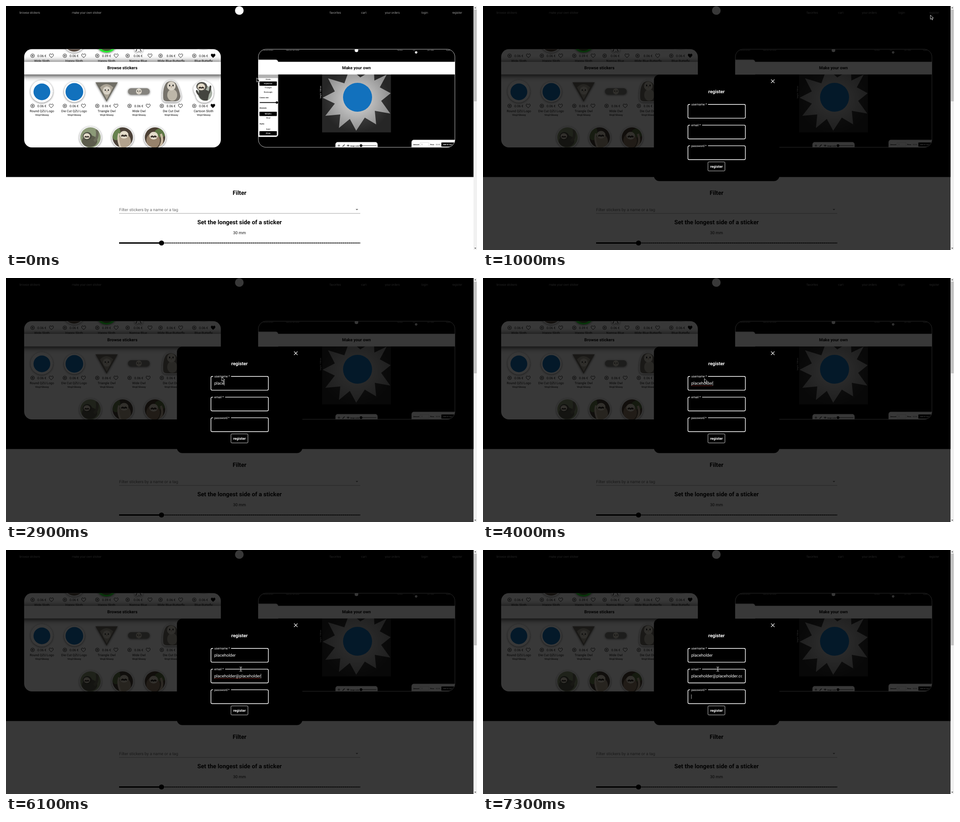
These frames come from a looping animation (1037 by 540 pixels, 8 s). An HTML page:

```html
<!DOCTYPE html>
<html lang="en">
<head>
<meta charset="utf-8">
<title>Sticker shop registration</title>
<style>
html, body { margin: 0; width: 100%; height: 100%; overflow: hidden; background: #000; }
svg { display: block; width: 100%; height: 100%; }
text { font-family: Roboto, sans-serif; text-rendering: geometricPrecision; white-space: pre; }
</style>
</head>
<body>
<svg id="stage" viewBox="0 0 1037 540" xmlns="http://www.w3.org/2000/svg"></svg>
<script>
const BLUE = '#1271bd';
const USER = 'placeholder';
const MAIL = USER + '@' + USER + '.com';

// Markup helpers
const text = (x, y, str, size, fill = '#000', weight = 400, anchor = 'middle', more = '') =>
  `<text x="${x}" y="${y}" font-size="${size}" fill="${fill}" font-weight="${weight}" text-anchor="${anchor}" ${more}>${str}</text>`;
const rect = (x, y, w, h, r, fill, more = '') =>
  `<rect x="${x}" y="${y}" width="${w}" height="${h}" rx="${r}" fill="${fill}" ${more}/>`;
const circle = (x, y, r, fill, more = '') => `<circle cx="${x}" cy="${y}" r="${r}" fill="${fill}" ${more}/>`;
const oval = (x, y, rx, ry, fill, more = '') =>
  `<ellipse cx="${x}" cy="${y}" rx="${rx}" ry="${ry}" fill="${fill}" ${more}/>`;
const path = (d, fill, more = '') => `<path d="${d}" fill="${fill}" ${more}/>`;
const line = (d, stroke, width, more = '') =>
  `<path d="${d}" fill="none" stroke="${stroke}" stroke-width="${width}" ${more}/>`;
const group = (more, ...parts) => `<g ${more}>${parts.join('')}</g>`;
const at = (x, y, s, ...parts) => group(`transform="translate(${x} ${y}) scale(${s})"`, ...parts);

const defs = `<defs>
  <clipPath id="left"><rect x="40" y="95.5" width="433" height="217.5" rx="17"/></clipPath>
  <clipPath id="right"><rect x="555.5" y="95.5" width="433" height="217.5" rx="17"/></clipPath>
  <clipPath id="mailbox"><rect x="458" y="270" width="112.3" height="20"/></clipPath>
  <clipPath id="disc"><circle r="22.5"/></clipPath>
  <filter id="blur" x="-20%" y="-150%" width="140%" height="400%"><feGaussianBlur stdDeviation="7"/></filter>
  <filter id="lift" x="-30%" y="-30%" width="160%" height="160%">
    <feDropShadow dx="0" dy="1" stdDeviation="2.2" flood-opacity=".6"/></filter>
  <radialGradient id="metal"><stop offset="0" stop-color="#555"/><stop offset="1" stop-color="#262626"/></radialGradient>
  <radialGradient id="silver"><stop offset="0" stop-color="#ddd"/><stop offset="1" stop-color="#909090"/></radialGradient>
</defs>`;

function nav() {
  const items = [[52.3, 'browse stickers'], [177.7, 'make your own sticker'], [725, 'favorites'],
    [787.8, 'cart'], [850.5, 'your orders'], [921.8, 'login'], [993.3, 'register']];
  return items.map(([x, s]) => text(x, 16.8, s, 6.6, '#e8e8e8', 300)).join('') + circle(513.7, 10, 9.5, '#fff');
}

const owl = (x, y, s) => at(x, y, s,
  oval(0, 0, 9, 9.5, '#d8d2c6'), oval(-3.6, -1, 1.3, 2, '#222'), oval(3.6, -1, 1.3, 2, '#222'),
  path('M-1 0L1 0L0 5Z', '#a8937a'));

const sloth = (x, y, s, face = '#e4dccb') => at(x, y, s,
  oval(0, 0, 9, 8, face), oval(-4, 0, 3, 1.8, '#3d332b', 'transform="rotate(-25)"'),
  oval(4, 0, 3, 1.8, '#3d332b', 'transform="rotate(25)"'), oval(0, 2.5, 2, 1.5, '#222'));

const HEART = 'M0 4.2C-7 -.6 -4.4 -4.6 -2 -4Q-.6 -3.7 0 -2.4Q.6 -3.7 2 -4C4.4 -4.6 7 -.6 0 4.2Z';

function offer(x, y, price, name, full, l = 20.5, r = 20.5) {
  return circle(x - l, y, 4, 'none', 'stroke="#111" stroke-width=".9"') +
    line(`M${x - l - 2.2} ${y}h4.4m-2.2 -2.2v4.4`, '#111', .9) +
    text(x, y + 2.6, price + ' €', 7.2, '#111') +
    at(x + r, y, 1, path(HEART, full ? '#000' : 'none', 'stroke="#111" stroke-width=".95"')) +
    text(x, y + 13.5, name, 7.15, '#111');
}

const photo = (x, y, bg, ...parts) => at(x, y, 1,
  circle(0, 0, 24.3, '#f4f4f4', 'filter="url(#lift)"'), circle(0, 0, 22.5, bg),
  group('clip-path="url(#disc)"', ...parts));

function browseCard() {
  const cols = [79, 150, 221.5, 292.5, 363.5, 435];
  const top = ['Wide Sloth', 'Happy Sloth', 'Happy Sloth', 'Narrow Blue', 'Wide Blue Butterfly', 'Blue Buttefly'];
  const low = ['Round QZU Logo', 'Die Cut QZU Logo', 'Triangle Owl', 'Wide Owl', 'Die Cut Owl', 'Cartoon Sloth'];
  const stickers = [
    circle(78.7, 189, 24.5, '#fff', 'filter="url(#lift)"') + circle(79, 190, 18.5, BLUE),
    circle(150.5, 190, 22.5, '#fff', 'filter="url(#lift)"') + circle(150.5, 190, 19.5, BLUE),
    path('M197 169H246L221.5 212Z', '#706e65', 'filter="url(#lift)"') +
      path('M207 180Q221 166 236 180L222 207Z', '#aaa395') + owl(222, 187, .95),
    rect(268.5, 182, 48, 14, 7, '#85837e', 'filter="url(#lift)"') + owl(292.5, 189, .7),
    path('M352 168Q364 160 375 169Q383 182 386 200Q386 211 374 213H355Q344 213 344 203Q343 178 352 168Z', '#e8e8e8', 'filter="url(#lift)"') +
      path('M353 170Q364 162 374 171Q382 185 384 200Q383 210 373 211H355Q346 211 346 203Q345 180 353 170Z', '#77736b') +
      oval(366, 197, 11, 13, '#bdb7a9') + owl(364, 177, 1.05),
    path('M425 168Q434 161 443 168Q458 174 457 192Q456 212 438 214Q420 214 418 198Q408 182 417 174Z', '#fff', 'filter="url(#lift)"') +
      oval(438, 193, 16, 17, '#a8b0a5') + path('M425 186Q437 181 448 190L444 209Q430 211 425 200Z', '#44443f') +
      oval(431, 178, 12, 10, '#55544e') + sloth(430, 179, .95) +
      line('M441 198Q450 192 450 178M426 197Q421 193 420 188', '#44443f', 4, 'stroke-linecap="round"'),
  ];
  return group('clip-path="url(#left)"',
    rect(40, 95, 433, 219, 0, '#fff'),
    circle(150, 79, 24, '#f4f4f4', 'filter="url(#lift)"') + circle(150, 79, 22, '#5a4c42'),
    circle(221.5, 79, 24, '#25e82f', 'filter="url(#lift)"') + circle(221.5, 79, 20, '#4d4a35'),
    path('M282 94H302L299 103L293 99L286 103Z', '#fff', 'filter="url(#lift)"') + line('M288 95L286 101M295 95L298 101', '#222', 1.5),
    oval(435, 92, 20, 5, '#bbb') + oval(79, 90, 24, 5, '#eee'),
    cols.map((x, i) => offer(x - (i == 3 ? 1.5 : 0), 110, i == 2 ? '0.09' : '0.06', top[i], i == 5,
      i == 3 || i == 4 ? 23.2 : 20.5, i == 3 ? 26 : 21)).join(''),
    rect(32, 125, 449, 28, 0, '#000', 'filter="url(#blur)"'),
    rect(40, 123.5, 433, 28, 0, '#fff'),
    ...stickers,
    cols.map((x, i) => offer(x, 221, '0.06', low[i], i == 5) +
      text(x + .3, 242.5, 'Vinyl/Glossy', 5.4, '#222', 500)).join(''),
    photo(186, 291, '#8c9a78', oval(-2, 8, 17, 13, '#5d5d4d'), oval(-7, -3, 10, 9, '#4c4c42'), sloth(-8, -3, .8),
      line('M8 8Q18 0 14 -18', '#6c6c5c', 6)),
    photo(257, 291, '#4b4138', oval(-15, -10, 10, 16, '#67824f'), oval(4, 9, 14, 17, '#b3a38e'), sloth(3, -6, 1.05),
      line('M-4 24Q-13 5 -8 -9', '#d6c9b5', 4)),
    photo(328, 291, '#4c4034', oval(12, -10, 13, 10, '#5e7845'), oval(-4, 7, 15, 17, '#97826b'), sloth(-3, -4, 1.05),
      line('M10 22Q20 8 13 -8', '#c9b9a1', 5))) +
    text(256.3, 140.3, 'Browse stickers', 9.25, '#000', 700);
}

function makerCard() {
  const star = 'M709 160L745 171L757 138L780 158L810 140L811 165L838 152L823 180L847 193L826 210L846 238L812 232' +
    'L815 262L790 247L771 276L757 250L733 270L736 240L703 243L724 216L697 203L724 189Z';
  const options = [[164, 'Circle'], [173, 'Explosion', 1], [182.3, 'Triangle'], [191.7, 'Rectangle'],
    [240, 'Metallic', 1], [249, 'Vinyl'], [273.7, 'Gold'], [283, 'Silver', 1]];
  const heads = [[203.6, 'Canvas size'], [227.4, 'Materials'], [261.5, 'Styles']];
  const tiny = [[578, 'browse stickers'], [631, 'make your own sticker'], [867.5, 'favorites'],
    [898, 'cart'], [935, 'your orders'], [973, 'logout']];
  return group('clip-path="url(#right)"',
    rect(555, 95, 434, 219, 0, '#000'),
    tiny.map(([x, s]) => text(x, 99.3, s, 3, '#ccc')).join(''),
    circle(771.6, 98, 4, '#fff'),
    circle(903, 102.6, 2.6, '#fff') + line('M903 101v1.8h1', '#000', .6),
    rect(550, 119, 49, 170.5, 5, '#fff', 'stroke="#aaa" stroke-width="1"'),
    options.map(([y, s, on]) => (on ? rect(558, y - 6, 38.3, 9.4, 1, '#000') : '') +
      text(577.2, y, s, 4.2, on ? '#fff' : '#222', 500)).join(''),
    heads.map(([y, s]) => text(558.3, y, s, 3.7, '#000', 700, 'start')).join(''),
    line('M558.5 213.6H596', '#000', 1.6) + circle(596.3, 213.6, 2.6, '#000'),
    rect(696, 140, 151.5, 139.7, 0, 'url(#metal)'),
    path(star, 'url(#silver)'),
    circle(774, 202, 32, BLUE),
    text(0, 0, 'height: 100mm', 4.2, '#ddd', 400, 'middle', 'transform="translate(693.6 190.5) rotate(-90)"'),
    rect(725.5, 301.3, 92.5, 20, 5, '#fff', 'stroke="#bbb" stroke-width=".7"'),
    line('M730.3 309h5.4M733 306.3v5.4', '#222', .9) + line('M741 311.3L745.5 306.8', '#222', 1.4) +
      line('M750.5 309Q753.3 305.8 756 309Q753.3 312 750.5 309Z', '#222', .8) + circle(753.3, 309, 1, '#222'),
    text(767.7, 310.5, 'Image scale', 3.6, '#000', 700),
    line('M781 309H815.5', '#222', .9) + circle(781.6, 309, 3, '#000'),
    rect(893, 296.3, 100, 24, 5, '#fff', 'stroke="#bbb" stroke-width=".7"'),
    text(903.3, 308, 'Amount', 3.7, '#000', 700) + text(915.8, 308, '1', 4, '#111') +
      rect(911.8, 302, 19.4, 9, 1, 'none', 'stroke="#bbb" stroke-width=".5"'),
    text(938.2, 308, 'Price', 3.7, '#000', 700) + text(951, 308, '0.3 €', 4, '#111'),
    rect(958.5, 302, 30, 9.2, 1, '#000') + text(972.3, 308, 'Add to cart', 4, '#fff', 700),
    rect(555, 151.5, 44, 8, 0, '#000', 'opacity=".3"'),
    rect(555, 123.5, 434, 28, 0, '#fff')) +
    rect(555.7, 95.7, 432.6, 217, 17, 'none', 'stroke="#eee" stroke-width=".8"') +
    text(771.6, 140.3, 'Make your own', 9.25, '#000', 700);
}

function filterPanel() {
  return rect(0, 378.5, 1030, 162, 0, '#fff') +
    text(514.2, 418.3, 'Filter', 13.1, '#000', 700) +
    text(249, 453.5, 'Filter stickers by a name or a tag', 9.02, '#6b6b6b', 400, 'start') +
    line('M249 459H780', '#8c8c8c', .8) + path('M769.8 449.2h5.6l-2.8 2.9Z', '#666') +
    text(514.1, 482.7, 'Set the longest side of a sticker', 13.1, '#000', 700) +
    text(514, 505.3, '30 mm', 9, '#111') +
    line('M249 524.5H780', '#8a8a8a', 1.3) +
    line('M249 524.5H780', '#000', 1.5, 'stroke-dasharray="3.6 1"') +
    line('M249 524.5H342', '#000', 3) + circle(342.4, 524.5, 5.6, '#000');
}

const scrollbar = rect(1029.3, 0, 8, 540, 0, '#f1f1f1') + rect(1030.3, 8, 6, 203, 0, '#c1c1c1') +
  path('M1031.2 5L1035.4 5L1033.3 2.6Z', '#505050') + path('M1031.2 535L1035.4 535L1033.3 537.4Z', '#505050');

function dialog() {
  const field = (y, label, gap, id) =>
    line(`M456 ${y}H454Q451.3 ${y} 451.3 ${y + 2.7}V${y + 28}Q451.3 ${y + 30.6} 454 ${y + 30.6}H575` +
      `Q577.6 ${y + 30.6} 577.6 ${y + 28}V${y + 2.7}Q577.6 ${y} 575 ${y}H${gap}`, '#fff', 1.4) +
    text(458.6, y + 2.2, label + ' *', 6.7, '#fff', 400, 'start') +
    (id ? text(458.5, y + 18.5, '', 9.05, '#fff', 400, 'start', `id="${id}"`) : '');
  return rect(0, 0, 1029.3, 540, 0, '#000', 'opacity=".78"') +
    rect(376.3, 152, 276.2, 235.5, 12, '#000') +
    line('M634.2 162.7l7.6 7.6m0 -7.6l-7.6 7.6', '#fff', 1.2) +
    text(514.1, 193.4, 'register', 10.35, '#fff', 700) +
    field(217.8, 'username', 495.5, 'user') +
    group('clip-path="url(#mailbox)"', text(458.5, 282, '', 9.05, '#fff', 400, 'start', 'id="mail"')) +
    field(263.6, 'email', 482.5) + field(309.4, 'password', 495.5) +
    group('clip-path="url(#mailbox)"', line('', '#e0453a', .8, 'id="mailMark" stroke-dasharray="1.2 .8"')) +
    line('', '#e0453a', .8, 'id="userMark" stroke-dasharray="1.2 .8"') +
    rect(495.3, 345, 37.4, 20, 2, 'none', 'stroke="#ddd" stroke-width=".9"') +
    text(514, 357.8, 'register', 7.95, '#fff', 700) +
    rect(0, 0, .7, 10, 0, '#fff', 'id="caret"');
}

const pointers = group('id="pointer"',
  path('M0 0V9.4L2.2 7.4L3.8 10.9L5.4 10.2L3.9 6.8H6.8Z', '#000', 'id="arrow" stroke="#fff" stroke-width=".8"'),
  path('M-1 .6Q0 -.6 .9 .6L1.3 4L4.6 4.6Q5.4 5 5.2 6.3L4.4 9.8H-.7L-3.3 6.2Q-3 5 -1.6 5.5L-.8 6.2Z', '#fff', 'id="hand" stroke="#111" stroke-width=".5"'),
  line('M-2.8 -4.4H-.7L0 -3.8L.7 -4.4H2.8M0 -3.8V3.8M-2.8 4.4H-.7L0 3.8L.7 4.4H2.8', '#fff', 1, 'id="beam"'));

document.getElementById('stage').innerHTML = defs + rect(0, 0, 1037, 540, 0, '#000') + nav() + browseCard() +
  makerCard() + filterPanel() + scrollbar + group('id="dialog"', dialog()) + pointers;

// Timeline: [ms, x, y] for the pointer, [ms, characters] for typing
const LOOP = 8000;
const route = [[0, 552, 159], [400, 846, 82], [500, 846, 82], [800, 997, 19], [900, 997, 19], [1000, 985, 20],
  [1600, 500, 224], [1700, 500, 224], [1900, 475, 219], [3900, 475, 219], [4100, 500, 226], [4200, 500, 226],
  [4600, 479, 283], [4900, 479, 283], [5000, 517, 263.6], [LOOP, 517, 263.6]];
const userKeys = [[1900, 1], [2200, 2], [2300, 4], [2900, 5], [3100, 7], [3300, 8], [3500, 10], [3800, 11]];
const mailKeys = [[5000, 11], [5600, 12], [6100, 23], [6300, 24], [6500, 26], [6800, 27]];

const el = {};
for (const node of document.querySelectorAll('#stage [id]')) el[node.id] = node;
const show = (node, on) => { node.style.display = on ? '' : 'none'; };
const typed = (keys, t) => keys.reduce((n, [ms, count]) => t >= ms ? count : n, 0);

function place(t) {
  const i = Math.max(1, route.findIndex(k => k[0] > t));
  const [t0, x0, y0] = route[i - 1], [t1, x1, y1] = route[i];
  const p = (t - t0) / (t1 - t0);
  return [x0 + (x1 - x0) * p, y0 + (y1 - y0) * p];
}

function draw(time) {
  const t = Math.floor(time % LOOP / 100) * 100;
  const [x, y] = place(t);
  el.pointer.setAttribute('transform', `translate(${x} ${y})`);
  const hand = t >= 800 && t < 1000, beam = t >= 4100;
  show(el.hand, hand);
  show(el.beam, beam);
  show(el.arrow, !hand && !beam);
  show(el.dialog, t >= 1000);
  if (t < 1000) return;

  el.user.textContent = USER.slice(0, typed(userKeys, t));
  el.mail.textContent = MAIL.slice(0, typed(mailKeys, t));
  const userWidth = el.user.getComputedTextLength();
  const mailWidth = el.mail.getComputedTextLength();
  const inMail = t >= 4800 && t < 7200;
  const shift = inMail ? Math.max(0, mailWidth - 111) : 0;
  el.mail.setAttribute('x', 458.5 - shift);

  el.userMark.setAttribute('d', `M458.5 238.4h${userWidth}`);
  show(el.userMark, t >= 3800 && t < 4800);
  el.mailMark.setAttribute('d', `M${458.5 - shift} 284.4h${mailWidth}`);
  show(el.mailMark, t >= 5000 && inMail);

  const width = t < 4800 ? userWidth : inMail ? mailWidth - shift : 0;
  el.caret.setAttribute('x', 458.6 + width);
  el.caret.setAttribute('y', t < 4800 ? 228 : inMail ? 273.8 : 319.6);
  show(el.caret, t >= 1900 && !(t >= 4100 && t < 4800) && !(t >= 5400 && t < 5600));
}

const start = performance.now();
function tick() {
  draw(performance.now() - start);
  requestAnimationFrame(tick);
}
tick();
</script>
</body>
</html>
```
